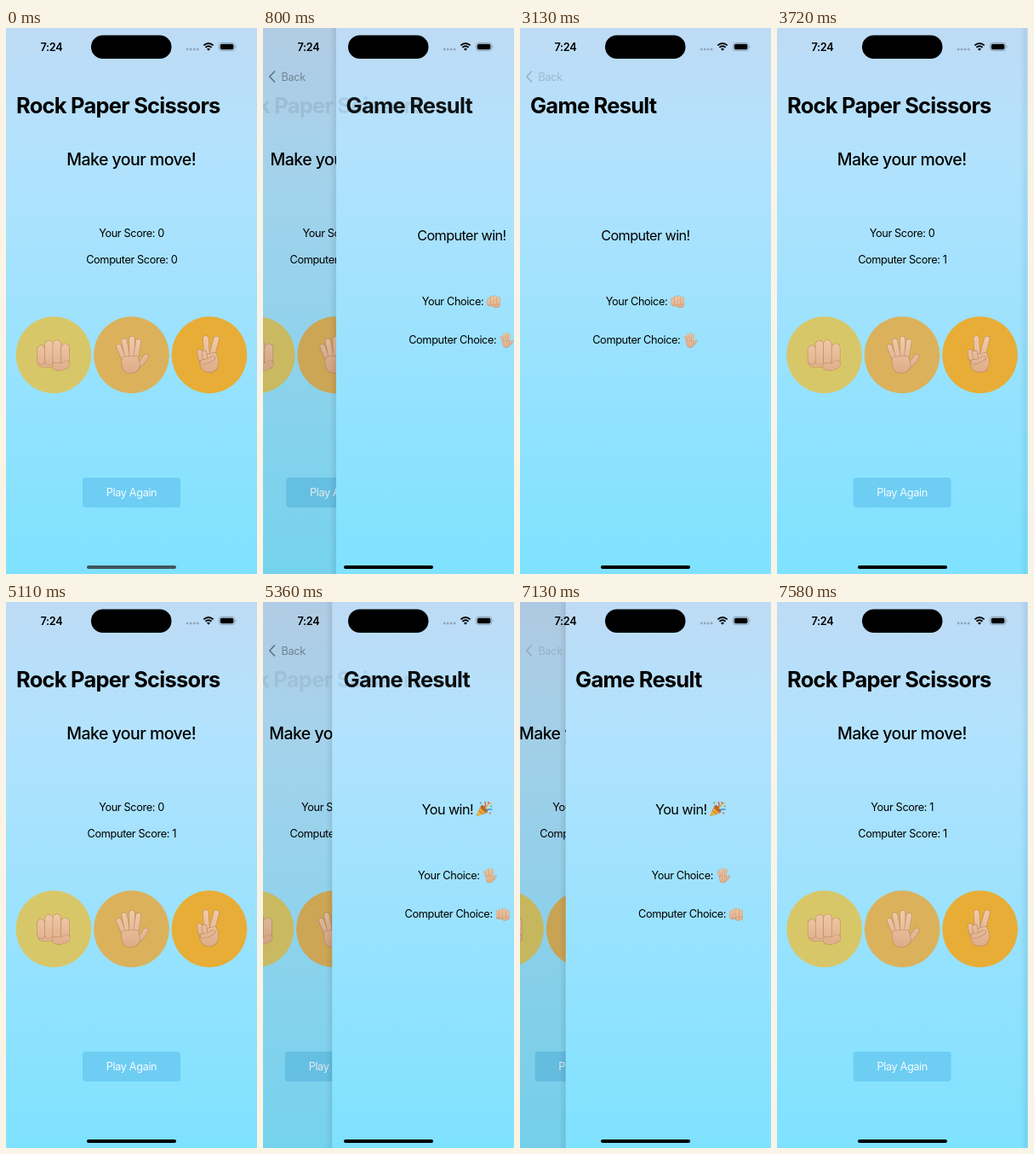
Recreate the animation shown at these times as an HTML page. Size 295 px wide and 640 px high, loop 8 s.

```html
<!DOCTYPE html>
<html lang="en">
<head>
<meta charset="utf-8">
<title>Rock Paper Scissors</title>
<style>
  html, body { margin: 0; width: 100%; height: 100%; overflow: hidden; background: #9fe3fe; }
  svg { display: block; width: 100vw; height: 100vh; }
  text {
    font: 400 12.75px Inter, Roboto, sans-serif;
    font-optical-sizing: none;
    letter-spacing: -.03em;
    text-anchor: middle;
  }
  .large { font-size: 25.5px; font-weight: 700; text-anchor: start; }
  .prompt { font-size: 19.5px; font-weight: 500; letter-spacing: -.028em; }
  .verdict { font-size: 16.2px; letter-spacing: -.035em; }
  .clock { font-weight: 600; letter-spacing: -.02em; }
  .start { text-anchor: start; }
</style>
</head>
<body>
<svg viewBox="0 0 295 640" preserveAspectRatio="none">
  <defs>
    <linearGradient id="sky" x1="0" y1="0" x2="0" y2="1">
      <stop offset="0" stop-color="#bedbf5"/>
      <stop offset=".22" stop-color="#b3e2fd"/>
      <stop offset="1" stop-color="#7ee2ff"/>
    </linearGradient>
    <linearGradient id="skin" gradientUnits="userSpaceOnUse" x1="0" y1="-20" x2="0" y2="22">
      <stop offset="0" stop-color="#f0caa8"/>
      <stop offset="1" stop-color="#deac88"/>
    </linearGradient>
    <linearGradient id="shade">
      <stop offset="0" stop-color="#000" stop-opacity="0"/>
      <stop offset="1" stop-color="#000" stop-opacity=".08"/>
    </linearGradient>
    <g id="rock"></g>
    <g id="paper"></g>
    <g id="scissors"></g>
    <g id="party">
      <path d="M-9 8.5 L-3.5 -4 Q2 -1 4 4Z" fill="#efb63c" stroke="#c98a22" stroke-width=".5"/>
      <path d="M-6 2 L-1 6 M-4.5 -1.5 L2 5" stroke="#d9772e" stroke-width="1.2"/>
      <ellipse cx=".4" cy="0" rx="2" ry="5.2" transform="rotate(-43)" fill="#a8662a"/>
      <g fill="none" stroke-width="1.4" stroke-linecap="round">
        <path d="M0 -1 Q3 -4 1 -8" stroke="#d9534f"/>
        <path d="M1.5 0 Q3 -5 8 -7" stroke="#e8a62b"/>
        <path d="M3 2 Q6 -1 9 1" stroke="#4a8fd0"/>
      </g>
      <g fill="#d9534f"><circle cx="7" cy="5" r="1"/><circle cx="5" cy="-7.5" r="1"/></g>
      <g fill="#5aa84f"><circle cx="-4" cy="-7" r="1"/><circle cx="8.5" cy="-3" r=".9"/></g>
    </g>
  </defs>

  <g id="home">
    <rect width="295" height="640" fill="url(#sky)"/>
    <text class="prompt" x="147.2" y="161">Make your move!</text>
    <text id="mine" x="147.5" y="245"></text>
    <text id="theirs" x="147.8" y="275.5"></text>
    <ellipse cx="56" cy="383.2" rx="44.4" ry="45" fill="#d8c768"/>
    <ellipse cx="147.5" cy="383.2" rx="44.4" ry="45" fill="#dbb25b"/>
    <ellipse cx="239" cy="383.2" rx="44.4" ry="45" fill="#e8ad36"/>
    <use href="#rock" x="56" y="383"/>
    <use href="#paper" x="148" y="383"/>
    <use href="#scissors" x="238" y="382"/>
    <rect x="90" y="527" width="115" height="35" rx="4" fill="#6dcdf3"/>
    <text x="147.5" y="549" fill="#f4fbff">Play Again</text>
    <rect id="dim" width="295" height="640"/>
  </g>

  <g id="result">
    <rect x="-8" width="8" height="640" fill="url(#shade)"/>
    <rect width="295" height="640" fill="url(#sky)"/>
    <text id="verdict" class="verdict" y="248.5"></text>
    <use id="cheer" href="#party" x="178.5" y="242.5"/>
    <text x="137" y="325">Your Choice:</text>
    <use id="yours" transform="translate(185.5 320.5) scale(.4)"/>
    <text x="136.8" y="370">Computer Choice:</text>
    <use id="cpu" transform="translate(200.5 366) scale(.4)"/>
  </g>

  <text id="homeTitle" class="large" y="100">Rock Paper Scissors</text>
  <text id="resultTitle" class="large" y="100">Game Result</text>
  <g id="back">
    <path d="M13.5 51 L7.8 57 L13.5 63" fill="none" stroke="#44525d" stroke-width="1.7"
          stroke-linecap="round" stroke-linejoin="round"/>
    <text class="start" x="21.5" y="61.5" fill="#566570">Back</text>
  </g>

  <text class="clock" x="53.5" y="26.5">7:24</text>
  <rect x="100" y="8.5" width="94.5" height="27.5" rx="13.75"/>
  <g fill="#8fa5b8">
    <circle cx="213.2" cy="25" r="1.4"/><circle cx="217.2" cy="25" r="1.4"/>
    <circle cx="221.2" cy="25" r="1.4"/><circle cx="225.2" cy="25" r="1.4"/>
  </g>
  <g fill="none" stroke="#000" stroke-width="1.8">
    <path d="M232.3 20.4 Q238 15.6 243.7 20.4"/>
    <path d="M234.4 22.8 Q238 19.8 241.6 22.8"/>
  </g>
  <path d="M236 24.6 Q238 23 240 24.6 L238 26.7Z"/>
  <rect x="250.4" y="17.4" width="18.4" height="9.2" rx="3" fill="none" stroke="#7f93a3" stroke-width=".8"/>
  <rect x="251.8" y="18.8" width="15.6" height="6.4" rx="1.8"/>
  <path d="M269.9 20.4 Q271.6 22 269.9 23.6Z" fill="#7f93a3"/>
  <rect id="bar" x="95" y="630" width="105" height="4" rx="2"/>
</svg>
<script>
const $ = id => document.getElementById(id);
const LOOP = 8000, WIDTH = 295, PARALLAX = 88.5, EDGE = '#b98763';

// Each part is [path, stroke width]; a darker pass below gives the outline.
const hands = {
  rock: [
    ['M-14 -5H12V10H-14Z', 8],
    ['M-14.8 -6.5V7', 9], ['M-5.6 -12V7', 9.2], ['M3.8 -12.5V7', 9.2], ['M13.6 -8V7.5', 9.6],
    ['M2.5 13.6Q10 15.5 15 11', 8]
  ],
  paper: [
    ['M-9 6L-15.5 -9.5', 5.4], ['M-5 4L-9 -16', 5.8], ['M0 4L0 -18.5', 6], ['M4.5 5L7.5 -15.5', 5.8],
    ['M5 15Q11 11 16.4 2', 5.6],
    ['M-9.5 5Q-11 18.5 -2 19Q5 19 7 13L5 4Z', 5]
  ],
  scissors: [
    ['M-2 2L-3.2 -18', 6.2], ['M4 2L9.2 -17.5', 6.2],
    ['M-8 5Q-9 18.5 1 19Q10 19 9 7L7 1Z', 5],
    ['M-10.5 -2.5L-9.5 5', 5.4], ['M-5 -1L-4 6', 5.4], ['M-7 9.5Q0 9 5 5', 5]
  ]
};

function stroke([d, w], color, extra, fill) {
  return `<path d="${d}" fill="${fill ? color : 'none'}" stroke="${color}" stroke-width="${w + extra}"/>`;
}
for (const [id, parts] of Object.entries(hands)) {
  const body = parts.map(part => {
    const solid = part[0].endsWith('Z');
    return stroke(part, EDGE, .9, solid) + stroke(part, 'url(#skin)', -.2, solid);
  }).join('');
  $(id).innerHTML = `<g stroke-linecap="round" stroke-linejoin="round">${body}</g>`;
}

// Page transitions: begin, end, settled time, and the page shown (1 = result).
const moves = [
  { at: 690, end: 1130, rest: 3130, to: 1 },
  { at: 3290, end: 3720, rest: 5110, to: 0 },
  { at: 5240, end: 5700, rest: 7010, to: 1 },
  { at: 7124, end: 7580, rest: LOOP, to: 0 }
];
const STEPS = 4, OMEGA = 15.5, LEAD = .05;

// Critically damped spring: the share of the way still to go.
const left = s => (1 + OMEGA * s) * Math.exp(-OMEGA * s);

function progress(t, move) {
  if (!move) return 0;
  if (t >= move.rest) return move.to;
  const step = (move.end - move.at) / STEPS;
  const k = Math.min(STEPS, Math.floor((t - move.at) / step));
  const gap = left(LEAD + k * step / 1000);
  return move.to ? 1 - gap : gap;
}

const shift = (id, x) => $(id).setAttribute('transform', `translate(${x.toFixed(2)} 0)`);
const fade = (id, a) => $(id).setAttribute('opacity', Math.max(0, Math.min(1, a)).toFixed(3));
function say(id, text) {
  if ($(id).textContent !== text) $(id).textContent = text;
}

function draw(t) {
  const move = moves.filter(m => m.at <= t).pop();
  const p = progress(t, move);
  const nav = Math.round(p * 100) / 100;
  const pressed = move && move.to && t >= move.rest;
  const won = t >= 5110;

  shift('home', -PARALLAX * p);
  fade('dim', .1 * p);
  shift('result', WIDTH * (1 - p));
  fade('result', p > 0 ? 1 : 0);
  shift('homeTitle', 12 - PARALLAX * nav);
  fade('homeTitle', 1 - 1.3 * nav);
  shift('resultTitle', 12 + WIDTH * (1 - nav));
  fade('resultTitle', nav * 1.3);
  fade('back', pressed ? .3 : move && !move.to ? nav * .3 : nav);

  say('mine', 'Your Score: ' + (t >= 7010 ? 1 : 0));
  say('theirs', 'Computer Score: ' + (t >= 3130 ? 1 : 0));
  say('verdict', won ? 'You win!' : 'Computer win!');
  $('verdict').setAttribute('x', won ? 135.5 : 147.4);
  fade('cheer', won ? 1 : 0);
  $('yours').setAttribute('href', won ? '#paper' : '#rock');
  $('cpu').setAttribute('href', won ? '#rock' : '#paper');
  $('bar').setAttribute('fill', t < 500 ? '#41555f' : '#000');
}

const begin = performance.now();
function tick() {
  draw((performance.now() - begin) % LOOP);
  requestAnimationFrame(tick);
}
tick();
</script>
</body>
</html>
```
